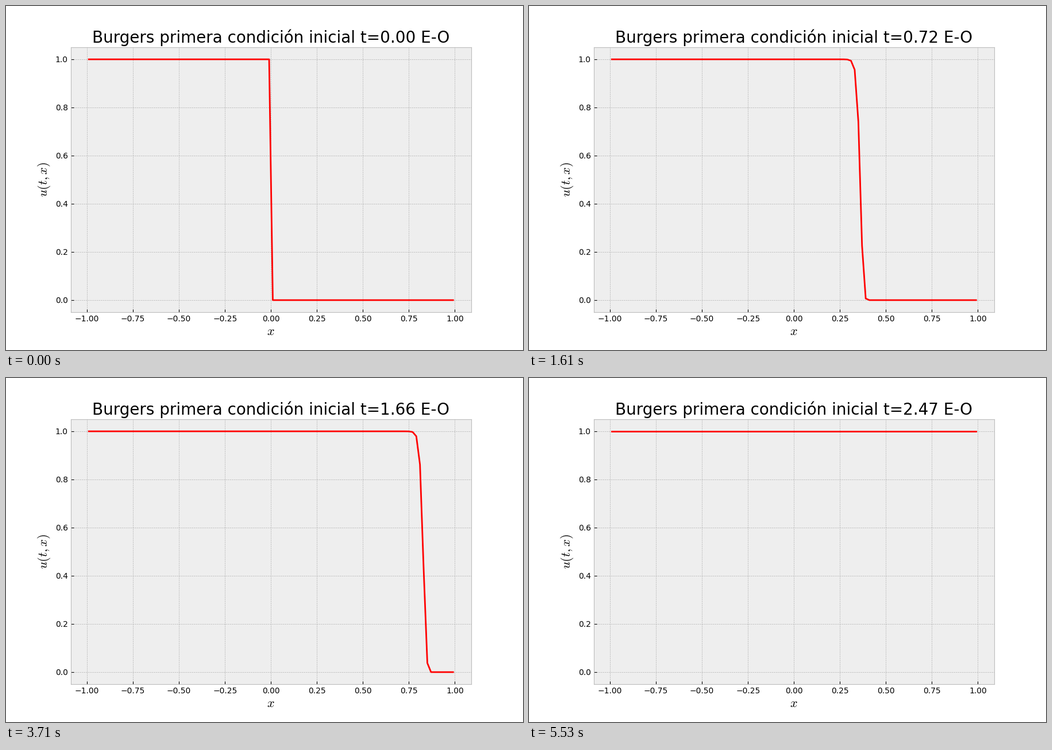
A matplotlib script for the animation above (5600 ms loop, 900 by 600 pixels).

```python
import numpy as np
import matplotlib.pyplot as plt
from matplotlib.animation import FuncAnimation

FRAMES = 80
INTERVAL = 70
STRIDE = 5               # solver steps per frame
STEPS = FRAMES * STRIDE
T_END = 2.5
DX = 0.02

x = np.linspace(-0.99, 0.99, 100)
times = np.linspace(0, T_END, STEPS)
ratio = T_END / (STEPS + 1) / DX


def flux(u):
    """Engquist-Osher flux for u >= 0."""
    return u ** 2 / 2


def solve():
    u = np.where(x < 0, 1.0, 0.0)
    history = [u]
    for _ in range(STEPS - 1):
        upwind = np.concatenate(([1.0], u[:-1]))
        u = u - ratio * (flux(u) - flux(upwind))
        history.append(u)
    return history


solution = solve()

plt.style.use("bmh")
plt.rcParams["font.family"] = "DejaVu Sans"
fig, ax = plt.subplots(figsize=(9, 6), dpi=100)
line, = ax.plot(x, solution[0], color="red", lw=2)
ax.set_xlim(-1.089, 1.089)
ax.set_ylim(-0.05, 1.05)
ax.set_xlabel("$x$", fontsize=16)
ax.set_ylabel("$u(t,x)$", fontsize=16)
title = ax.set_title("", fontsize=20)


def update(frame):
    n = frame * STRIDE
    line.set_ydata(solution[n])
    title.set_text(f"Burgers primera condición inicial t={times[n]:.2f} E-O")
    return line, title


anim = FuncAnimation(fig, update, frames=FRAMES, interval=INTERVAL,
                     repeat=True, repeat_delay=0)
plt.show()
```
